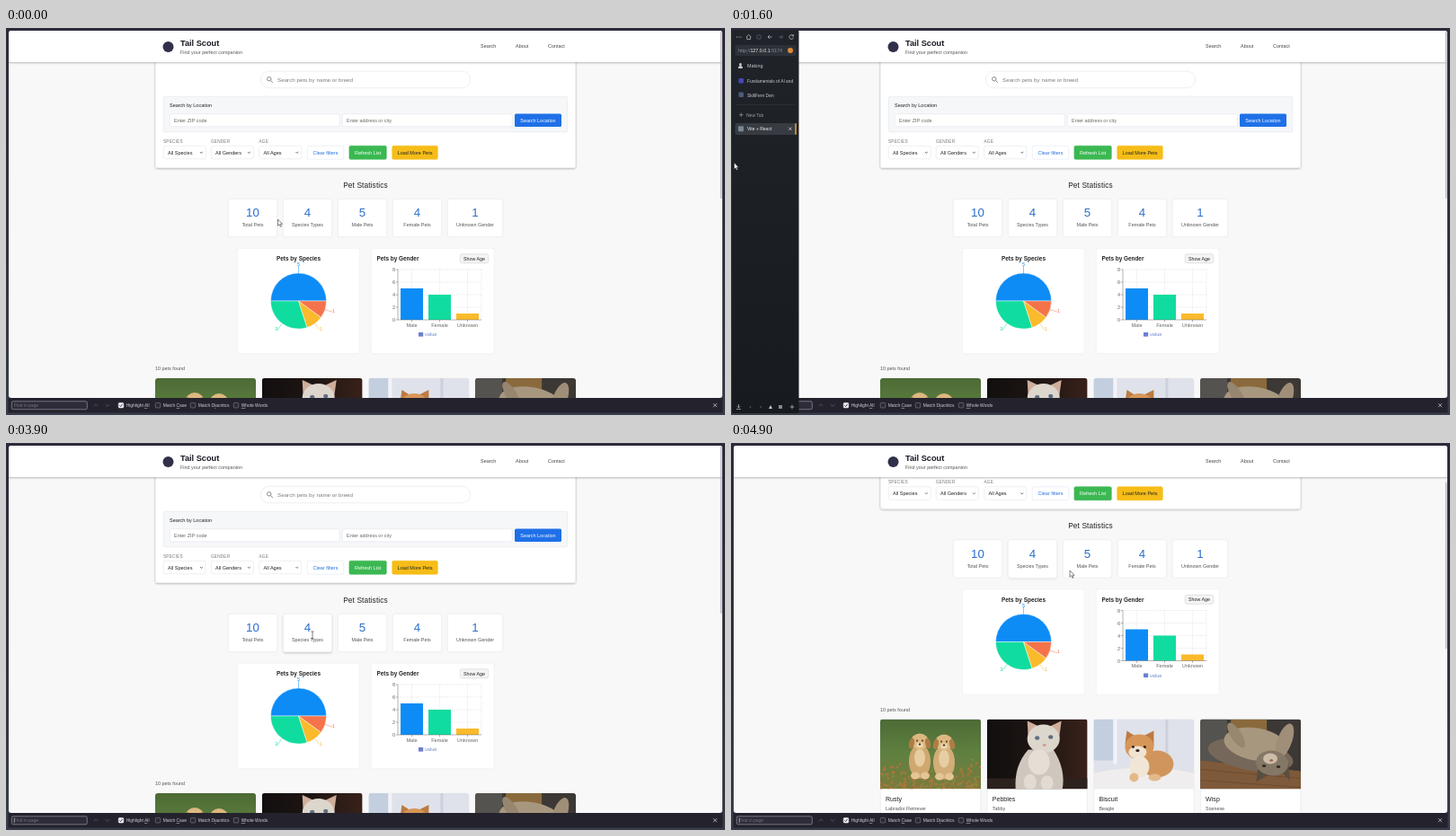
Recreate the animation shown at these times as an HTML page. Size 800 by 431 pixels, loop 5 s.

```html
<!DOCTYPE html>
<html lang="en">
<head>
<meta charset="utf-8">
<title>Pet search page</title>
<style>
html, body { margin: 0; width: 100%; height: 100%; overflow: hidden; background: #2e2c3a; }
svg { display: block; width: 100%; height: 100%; }
text { font-family: "Liberation Sans", Arial, sans-serif; white-space: pre; }
</style>
</head>
<body>
<svg id="stage" viewBox="0 0 800 431"></svg>
<script>
const rect = (x, y, w, h, fill, r = 0, more = '') =>
  `<rect x="${x}" y="${y}" width="${w}" height="${h}" rx="${r}" fill="${fill}" ${more}/>`;
const box = (x, y, w, h, r = 2, fill = '#fff', line = '#e2e4e9') =>
  rect(x + .25, y + .25, w - .5, h - .5, fill, r, `stroke="${line}" stroke-width=".6"`);
const text = (s, x, y, size = 5.45, fill = '#444', more = '') =>
  `<text x="${x}" y="${y}" font-size="${size}" fill="${fill}" ${more}>${s}</text>`;
const mid = ' text-anchor="middle"', end = ' text-anchor="end"', bold = ' font-weight="700"';
const path = (d, stroke, w = .7, fill = 'none', more = '') =>
  `<path d="${d}" stroke="${stroke}" stroke-width="${w}" fill="${fill}" ${more}/>`;
const oval = (x, y, rx, ry, fill, turn = 0) =>
  `<ellipse cx="${x}" cy="${y}" rx="${rx}" ry="${ry}" fill="${fill}" transform="rotate(${turn} ${x} ${y})"/>`;
const shape = (d, fill) => path(d, 'none', 0, fill);
const shadow = 'filter="url(#shadow)"';
const blue = '#0d8cf6', green = '#11dc9f', yellow = '#fbba2b', orange = '#f5734a';

let seed = 7;
const rand = () => (seed = seed * 16807 % 2147483647) / 2147483647;

function filters() {
  const select = (label, value, x) =>
    text(label, x, 127.8, 4.7, '#777', 'letter-spacing=".2"') + box(x, 131, 47.5, 15) +
    text(value, x + 5, 140.5, 5.55, '#222') +
    path(`M${x + 41} 138l1.4 1.4 1.4-1.4`, '#333');
  const button = (s, x, w, fill, color, line = fill) =>
    box(x, 131, w, 15.4, 1.5, fill, line) + text(s, x + w / 2, 140.5, 5.5, color, mid);
  return rect(166, 30, 468, 126, '#fff', 3, shadow) + box(166, 30, 468, 126, 3, '#fff', '#dcdde0') +
    box(283, 48, 234, 19, 9.5) +
    path('M294.8 58.8l2 2M290.6 56.8a2.2 2.2 0 1 0 4.4 0a2.2 2.2 0 1 0-4.4 0', '#777', .9) +
    text('Search pets by name or breed', 302, 59.6, 6.25, '#7c7c82') +
    box(175, 76, 450, 40, 2, '#f6f7f9') +
    text('Search by Location', 182, 88.2, 5.5, '#222') +
    box(182, 95.5, 189.5, 14.5) + text('Enter ZIP code', 187, 104.6, 5.5, '#666') +
    box(374, 95.5, 189.5, 14.5) + text('Enter address or city', 379, 104.6, 5.45, '#666') +
    rect(566, 95.5, 52, 14.5, '#1f70e8', 1.5) + text('Search Location', 592, 104.6, 5.45, '#fff', mid) +
    select('SPECIES', 'All Species', 175) + select('GENDER', 'All Genders', 228) + select('AGE', 'All Ages', 281.5) +
    button('Clear filters', 335, 41, '#fff', '#1f6fe0', '#dfe6f2') +
    button('Refresh List', 381.7, 41.8, '#3bb852', '#fff') +
    button('Load More Pets', 429.5, 51, '#f6bd18', '#222');
}

function stats() {
  const cards = [[247, 55, 10, 'Total Pets'], [308, 55, 4, 'Species Types'], [369, 55, 5, 'Male Pets'],
    [430, 55, 4, 'Female Pets'], [491, 62, 1, 'Unknown Gender']];
  return text('Pet Statistics', 400, 177.6, 8.3, '#222', mid + ' letter-spacing=".12"') +
    cards.map(([x, w, n, label], i) =>
      (i == 1 ? rect(x + .5, 191, w - 1, 42, '#fff', 2.5, shadow + ' id="hover"') : '') + box(x, 190, w, 43, 2.5) +
      text(n, x + w / 2, 210.4, 13.3, '#2a6dc9', mid) +
      text(label, x + w / 2, 221.2, 5.4, '#555', mid)).join('');
}

function pie() {
  const cx = 325.5, cy = 304, r = 31;
  const at = (deg, d) => {
    const a = deg * Math.PI / 180;
    return [cx + d * Math.cos(a), cy - d * Math.sin(a)];
  };
  let deg = 0;
  return box(257, 245, 136.5, 118, 2.5, '#fff', '#ebecef') +
    text('Pets by Species', 325.5, 259, 6.45, '#222', bold + mid) +
    [[5, blue, mid], [3, green, end], [1, yellow, ''], [1, orange, '']].map(([n, color, anchor]) => {
      const from = deg, to = deg += n * 36, half = (from + to) / 2, [x, y] = at(half, 39.4);
      return path(`M${cx} ${cy}L${at(from, r)}A${r} ${r} 0 0 0 ${at(to, r)}Z`, '#fff', .45, color) +
        path(`M${at(half, r)}L${x} ${y}`, color, .5) + text(n, x, y + .8, 5.4, color, anchor);
    }).join('');
}

function bars() {
  const grid = [451.5, 482.5, 513.5, 529].map(x => `M${x} 269V325`).join('') +
    [269, 283, 297, 311].map(y => `M436 ${y}H529`).join('');
  return box(406, 245, 137.5, 118, 2.5, '#fff', '#ebecef') +
    text('Pets by Gender', 412.5, 259, 6.4, '#222', bold) +
    box(505, 251.5, 32, 10.5, 2, '#f4f4f5', '#d4d4d8') + text('Show Age', 521, 258.6, 5.3, '#222', mid) +
    path(grid, '#ccc', .45, 'none', 'stroke-dasharray="1.3 1.3"') +
    [0, 2, 4, 6, 8].map(n => text(n, 433, 327 - n * 7, 5.6, '#666', end) +
      path(`M433.8 ${325 - n * 7}H436`, '#666', .5)).join('') +
    [['Male', 5, blue], ['Female', 4, green], ['Unknown', 1, yellow]].map(([s, n, color], i) =>
      rect(439 + i * 31, 325 - n * 7, 25, n * 7, color) +
      text(s, 451.5 + i * 31, 332.6, 5.6, '#666', mid) +
      path(`M${451.5 + i * 31} 325v2.3`, '#666', .5)).join('') +
    path('M436 269V325H529', '#666', .5) +
    rect(459, 339, 5.2, 4.6, '#6b80cf') + text('value', 466, 343.2, 5.6, '#7087cf');
}

// Soft stand-ins for the four pet pictures, each 112 by 78.
function puppies() {
  const pup = (x, y, c) => oval(x, y + 22, 12, 19, c) + oval(x - 5, y + 38, 5, 4, '#e3c596') +
    oval(x + 6, y + 38, 5, 4, '#e3c596') + oval(x, y + 18, 6, 10, '#e6cda2') + oval(x, y, 10, 9, '#dcb880') +
    oval(x - 9, y + 2, 3, 6, '#b07c46', 12) + oval(x + 9, y + 2, 3, 6, '#b07c46', -12) +
    oval(x, y + 4, 4, 3, '#ecd5ac') + oval(x, y + 3, 1.3, 1, '#33261c') +
    oval(x - 3, y - 1, .9, .9, '#33261c') + oval(x + 3, y - 1, .9, .9, '#33261c');
  let leaves = '';
  for (let i = 0; i < 150; i++)
    leaves += oval(rand() * 112, 44 + Math.sqrt(rand()) * 34, 1.7, .9, i % 3 ? '#b5743a' : '#86893f', rand() * 180);
  return rect(0, 0, 112, 78, 'url(#grass)') + leaves + pup(44, 25, '#cfa870') + pup(71, 26, '#d2ad77');
}
function kitten() {
  return rect(0, 0, 112, 78, 'url(#dusk)') + rect(0, 66, 112, 12, '#2c211d') +
    shape('M32 78Q30 52 46 34L74 34Q88 56 84 78Z', '#cfc7be') +
    shape('M46 22L45 2L62 10ZM68 9L83 2L80 24Z', '#cfae9c') +
    oval(63, 22, 18, 16, '#ddd6cd') + oval(56, 21, 2.6, 2.2, '#5d6e80') + oval(71, 20, 2.6, 2.2, '#5d6e80') +
    oval(64, 29, 2, 1.3, '#cf9386') + oval(58, 48, 12, 14, '#e4ded6') +
    oval(48, 70, 7, 9, '#e2dbd2') + oval(67, 71, 7, 8, '#e2dbd2');
}
function shiba() {
  return rect(0, 0, 112, 78, '#dfe2ea') + rect(0, 0, 22, 46, '#c3cfdf') + rect(22, 0, 4, 50, '#f1f3f7') +
    rect(80, 0, 3, 50, '#cdd1dc') + oval(56, 76, 80, 22, '#efedee') +
    oval(71, 50, 18, 15, '#d0955c') + shape('M35 28L37 13L48 20ZM55 19L67 13L67 30Z', '#bd7a42') +
    oval(51, 31, 16, 14, '#d69658') + oval(49, 37, 10, 7, '#f0e2d2') + oval(51, 53, 11, 12, '#f1e5d6') +
    oval(44, 31, 1.5, 1.4, '#30231f') + oval(57, 31, 1.5, 1.4, '#30231f') + oval(49, 35, 2.1, 1.5, '#30231f') +
    oval(45, 65, 5, 5, '#e3b98a') + oval(68, 65, 7, 4, '#e3b98a');
}
function lyingCat() {
  return rect(0, 0, 112, 78, '#3c3835') + rect(0, 0, 30, 48, '#55534f') + rect(34, 0, 40, 14, '#8a6a3c') +
    shape('M0 46L112 58V78H0Z', '#7f5a3a') + path('M0 56L112 66M0 68L112 76', '#64452e') +
    oval(56, 40, 48, 17, '#75685a', 10) + oval(62, 28, 36, 18, '#a8977f', 10) +
    oval(40, 18, 6, 16, '#978670', -32) + oval(94, 24, 8, 20, '#a08f78', 20) +
    shape('M64 56L62 70L76 62ZM90 58L100 69L98 48Z', '#594d40') +
    oval(80, 49, 18, 14, '#857766', 8) + oval(78, 44, 8, 6, '#cbbda8') +
    oval(71, 52, 2.3, 1.5, '#332d26') + oval(87, 53, 2.3, 1.5, '#332d26') + oval(79, 46, 2, 1.3, '#9c6359');
}

function pets() {
  const list = [['Rusty', 'Labrador Retriever', puppies], ['Pebbles', 'Tabby', kitten],
    ['Biscuit', 'Beagle', shiba], ['Wisp', 'Siamese', lyingCat]];
  return text('10 pets found', 166, 381, 5.45, '#555') + list.map(([name, breed, draw], i) =>
    `<g transform="translate(${166 + i * 118.7} 390)">` + box(0, 0, 112, 125, 3) +
    `<g clip-path="url(#photo)">${draw()}</g>` +
    text(name, 6, 91.6, 7.1, '#222') + text(breed, 6, 101, 5.4, '#555') + '</g>').join('');
}

function header() {
  return rect(0, 0, 800, 38, '#fff', 0, shadow) + oval(180.5, 21, 6, 6, '#30304a') +
    text('Tail Scout', 194, 20, 9.2, '#171721', bold) +
    text('Find your perfect companion', 194, 29.3, 5.45, '#555') +
    text('Search', 528, 22.4) + text('About', 567, 22.4) + text('Contact', 603, 22.4);
}

function findBar() {
  const u = s => `<tspan text-decoration="underline">${s}</tspan>`;
  const check = (x, s, on) =>
    box(x, 417.2, 6, 6, 1, on ? '#f0f0f4' : '#2b2a33', on ? '#f0f0f4' : '#85848f') +
    (on ? path(`M${x + 1.4} 420.3l1.2 1.3 2-2.7`, '#222', .8) : '') +
    text(s, x + 8.7, 422.1, 4.95, '#cfced8');
  return rect(2.5, 412, 795, 16.5, '#24232d') + box(6, 415.5, 84.5, 9.5, 1.5, '#2d2c37', '#aaa9b8') +
    text('Find in page', 9, 422, 4.9, '#74737f') +
    path('M97.6 421.2l2.4-2.4 2.4 2.4M110.6 419l2.4 2.4 2.4-2.4', '#65646f') +
    check(125, `Highlight ${u('A')}ll`, true) + check(166, `Match ${u('C')}ase`) +
    check(205, `Match D${u('i')}acritics`) + check(253, `${u('W')}hole Words`) +
    path('M787 418.2l4 4M791 418.2l-4 4', '#ddd') +
    path('M9.2 417.5V423.2', '#eee', .5, 'none', 'id="caret"');
}

function sidebar() {
  const c = '#c6c9ce', dim = '#686c73';
  return rect(1, 2, 74.5, 427, 'url(#side)', 2) +
    [6.5, 8.7, 10.9].map(x => oval(x, 10, .6, .6, c)).join('') +
    path('M17 10l2.7-2.5 2.7 2.5M17.8 9.6v3h3.8v-3', c) + box(28.5, 7.8, 5, 4.5, 1, 'none', dim) +
    path('M45.5 10H41m2-2l-2 2 2 2', c) + path('M53 10h4.5m-2-2l2 2-2 2', dim) +
    path('M69.2 8.7a2.4 2.4 0 1 0 .3 2M69.4 7v2h-2', c) +
    rect(4.5, 19, 68, 12, '#2d3138', 2.5) +
    text('<tspan fill="#8d9299">http://</tspan>127.0.0.1<tspan fill="#8d9299">:5174</tspan>', 8, 27, 5.35, '#eee') +
    oval(66, 25, 3, 3, '#df893d') +
    oval(10.5, 40.5, 1.5, 1.5, c) + shape('M8 45q0-3 2.5-3t2.5 3z', c) + text('Making', 18, 44, 5.4, c) +
    rect(8.5, 56, 5.5, 5.5, '#4947b6', 1) + text('Fundamentals of AI and', 18, 61, 4.85, c) +
    rect(8.5, 71.5, 5.5, 5.5, '#4c5c7c', 1) + text('SkillFern Den', 18, 76.5, 4.95, c) +
    path('M6 85.5H71', '#363a41', .5) +
    path('M9 96.7h4.6m-2.3-2.3v4.6', '#9a9ea5') + text('New Tab', 17, 98.6, 5, '#9a9ea5') +
    rect(4.5, 106, 68.5, 13, '#373c43', 2) + rect(71, 106, 2, 13, '#c3842e', 1) +
    rect(8, 109.2, 6, 6, '#7a8694', 1) + text('Vite + React', 18, 114.2, 5, '#f0f0f2') +
    path('M64.2 110.6l3.4 3.4m0-3.4l-3.4 3.4', '#ddd') +
    path('M8.5 419v4m-1.7-1.7l1.7 1.7 1.7-1.7M6 424.5h5', c) +
    oval(21.5, 422, .8, .8, dim) + oval(33, 422, .8, .8, dim) + shape('M42 424l2-4 2 4z', c) +
    rect(53, 420, 4, 4, '#858991') + path('M65.7 422h4.6m-2.3-2.3v4.6', c);
}

const stage = document.getElementById('stage');
const gradient = (id, way, ...colors) => `<linearGradient id="${id}" x1="0" y1="0" ${way}>` +
  colors.map((c, i) => `<stop offset="${i / (colors.length - 1)}" stop-color="${c}"/>`).join('') + '</linearGradient>';
const down = 'x2="0" y2="1"', across = 'x2="1" y2="0"';

stage.innerHTML = `<defs>
  <filter id="shadow" x="-10%" y="-20%" width="120%" height="150%">
    <feDropShadow dx="0" dy=".8" stdDeviation=".8" flood-color="#000" flood-opacity=".3"/></filter>
  <clipPath id="page">${rect(3, 3, 794, 409, '#000', 3)}</clipPath>
  <clipPath id="photo"><path d="M0 78V3q0-3 3-3H109q3 0 3 3V78z"/></clipPath>` +
  gradient('grass', down, '#4c6b36', '#5f8140', '#7d7a3d') + gradient('dusk', across, '#120f0f', '#1d1513', '#39211a') +
  gradient('side', down, '#20242a', '#171a1f') + gradient('frame', down, '#2d2a3a', '#30303e', '#383d4a') +
  '</defs>' + rect(0, 0, 800, 431, 'url(#frame)') +
  `<g clip-path="url(#page)">${rect(3, 3, 794, 409, '#f8f8f9')}
  <g id="content">${filters()}${stats()}${pie()}${bars()}${pets()}</g>${header()}
  ${rect(794.9, 4, 1.7, 186, '#bdbdc3', .8, 'id="thumb"')}</g>` + findBar() +
  `<g id="sidebar">${sidebar()}</g>` +
  path('M0 0V7.2L1.7 5.7 2.9 8.3 4 7.8 2.9 5.3H5Z', '#333', .6, '#fff', 'id="arrow"') +
  path('M-1.5 0H1.5M0 0V8M-1.5 8H1.5', '#444', .7, 'none', 'id="beam"');

const part = Object.fromEntries(['content', 'thumb', 'sidebar', 'arrow', 'beam', 'caret', 'hover']
  .map(id => [id, document.getElementById(id)]));

// Keys are [time, value, ...], joined by straight lines.
function tween(keys, t) {
  const i = keys.findIndex(k => k[0] > t);
  if (i < 0) return keys[keys.length - 1].slice(1);
  if (!i) return keys[0].slice(1);
  const a = keys[i - 1], b = keys[i], p = (t - a[0]) / (b[0] - a[0]);
  return a.slice(1).map((v, j) => v + (b[j + 1] - v) * p);
}
const pointer = [[0, 302.5, 213], [100, 302.5, 213], [600, 60, 165], [900, -12, 155], [1100, -12, 152],
  [1300, 3.5, 150], [1800, 3.5, 150], [2100, 70, 165], [2400, 250, 190], [2800, 389.5, 208],
  [3000, 430, 207], [3100, 430, 207], [3500, 341, 210], [3900, 341, 210], [4100, 338, 210],
  [4300, 338, 210], [4900, 377, 142]];
const scroll = [[3900, 0], [4000, 28], [4100, 70.8], [4200, 82.5]];
const slide = [[1000, -78], [1200, 0], [2000, 0], [2200, -78]];
const lift = [[3300, 0], [3500, .8], [3900, .8], [4100, .4]];

function move(node, x, y) { node.setAttribute('transform', `translate(${x} ${y})`); }
function show(node, amount) { node.setAttribute('opacity', Number(amount)); }

function frame(now) {
  const t = Math.floor(now % 5000 / 100) * 100;
  const [x, y] = tween(pointer, t), [top] = tween(scroll, t);
  const typing = t >= 3400 && t < 4000;
  move(part.content, 0, -top);
  move(part.thumb, 0, top * .48);
  move(part.sidebar, tween(slide, t)[0], 0);
  move(part.arrow, x, y);
  move(part.beam, x, y);
  show(part.arrow, !typing);
  show(part.beam, typing);
  show(part.caret, t >= 2500);
  show(part.hover, tween(lift, t)[0]);
  requestAnimationFrame(frame);
}
frame(0);
</script>
</body>
</html>
```
